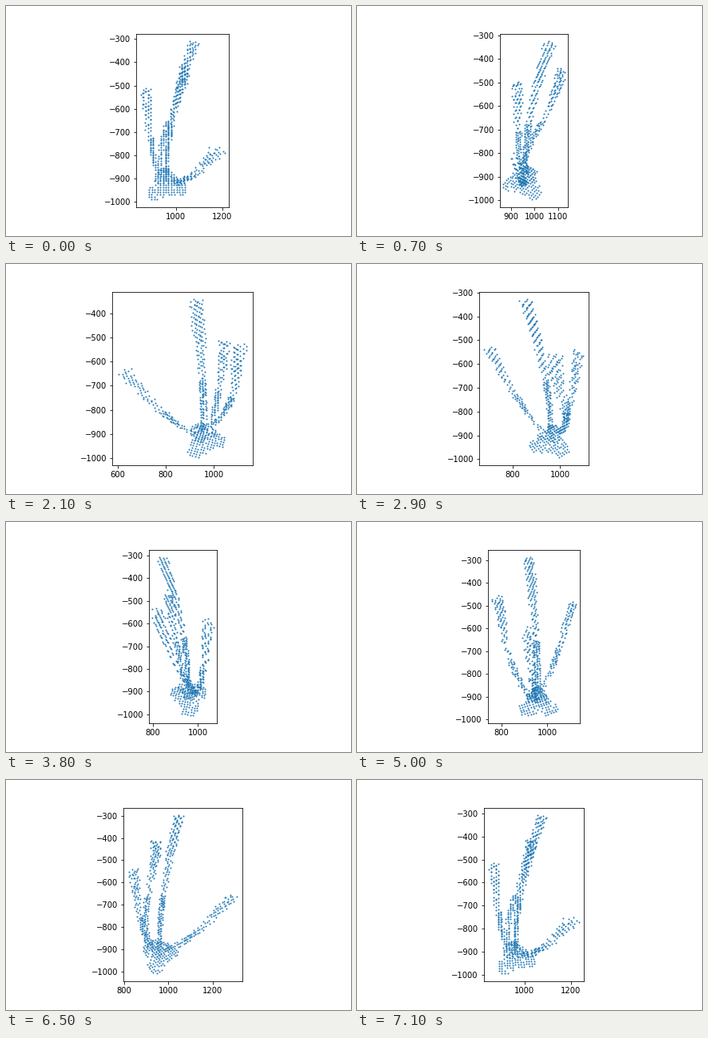
Write a matplotlib script that moves like this. It is 432 px wide and 288 px high and loops after 7200 ms.

```python
import numpy as np
import matplotlib.pyplot as plt
from matplotlib.animation import FuncAnimation

FRAMES, INTERVAL = 72, 100
STEP = 11.5                  # voxel size
BASE, FOOT = -926, -900      # lowest layer, height where the leaves start
AXIS_X, HORIZON, CAMERA = 957, -79, 1000

# azimuth (degrees), tip height, reach, bend exponent, twist at the foot
LEAVES = [(-1, -316, 122, 1.9, 0),
          (218, -541, 118, 0.35, -10),
          (58, -588, 312, 0.68, 0),
          (-60, -476, 185, 0.52, -72)]


def voxel_grid():
    """Index lattice (i, j, k) around the stem."""
    side = np.arange(-30, 31)
    return np.meshgrid(side, side, np.arange(54), indexing="ij")


def leaf_mask(i, j, k, azimuth, tip, reach, bend, twist):
    y = BASE + STEP * k
    f = np.clip((y - FOOT) / (tip - FOOT), 0, 1)
    az = np.radians(azimuth + twist * (1 - f) ** 2)
    radial = STEP * (i * np.cos(az) + j * np.sin(az)) - reach * f ** bend
    side = STEP * (j * np.cos(az) - i * np.sin(az))
    thick, wide = 12 + 14 * f ** 1.5, 12 + 20 * f ** 1.5
    inside = (radial / thick) ** 2 + (side / wide) ** 2 <= 1
    # The blade is an open lattice, the stalk is solid.
    filled = (f < 0.4) | ((i + j + k) % 3 == 0)
    return inside & filled & (y >= FOOT) & (y <= tip + 1)


def base_mask(i, j, k):
    """A flat three-lobed foot with a small dense layer on top."""
    r = STEP * np.hypot(i, j)
    rim = 74 + 20 * np.cos(3 * (np.arctan2(j, i) - np.radians(140)))
    return ((k == 0) & (r <= rim)) | ((k == 3) & (r <= 0.6 * rim))


def build_plant():
    grid = voxel_grid()
    mask = base_mask(*grid)
    for leaf in LEAVES:
        mask |= leaf_mask(*grid, *leaf)
    i, j, k = (axis[mask] for axis in grid)
    keep = np.random.default_rng(4).random(len(i)) < 0.86
    return STEP * i[keep], STEP * j[keep], BASE + STEP * k[keep]


def project(angle):
    """Turn the plant about its stem and view it in perspective."""
    x, z, y = plant
    c, s = np.cos(angle), np.sin(angle)
    scale = 1 / (1 - (x * s + z * c) / CAMERA)
    return (AXIS_X + (x * c - z * s) * scale,
            HORIZON + (y - HORIZON) * scale)


def draw(frame):
    ax.clear()
    ax.set_aspect("equal")
    ax.scatter(*project(2 * np.pi * frame / FRAMES), s=1, color="#1f77b4")


plant = build_plant()
fig, ax = plt.subplots(figsize=(6, 4), dpi=72)
fig.subplots_adjust(left=0.125, right=0.9, bottom=0.125, top=0.88)
anim = FuncAnimation(fig, draw, frames=FRAMES, interval=INTERVAL,
                     init_func=lambda: None, repeat=True, repeat_delay=0)
plt.show()
```
